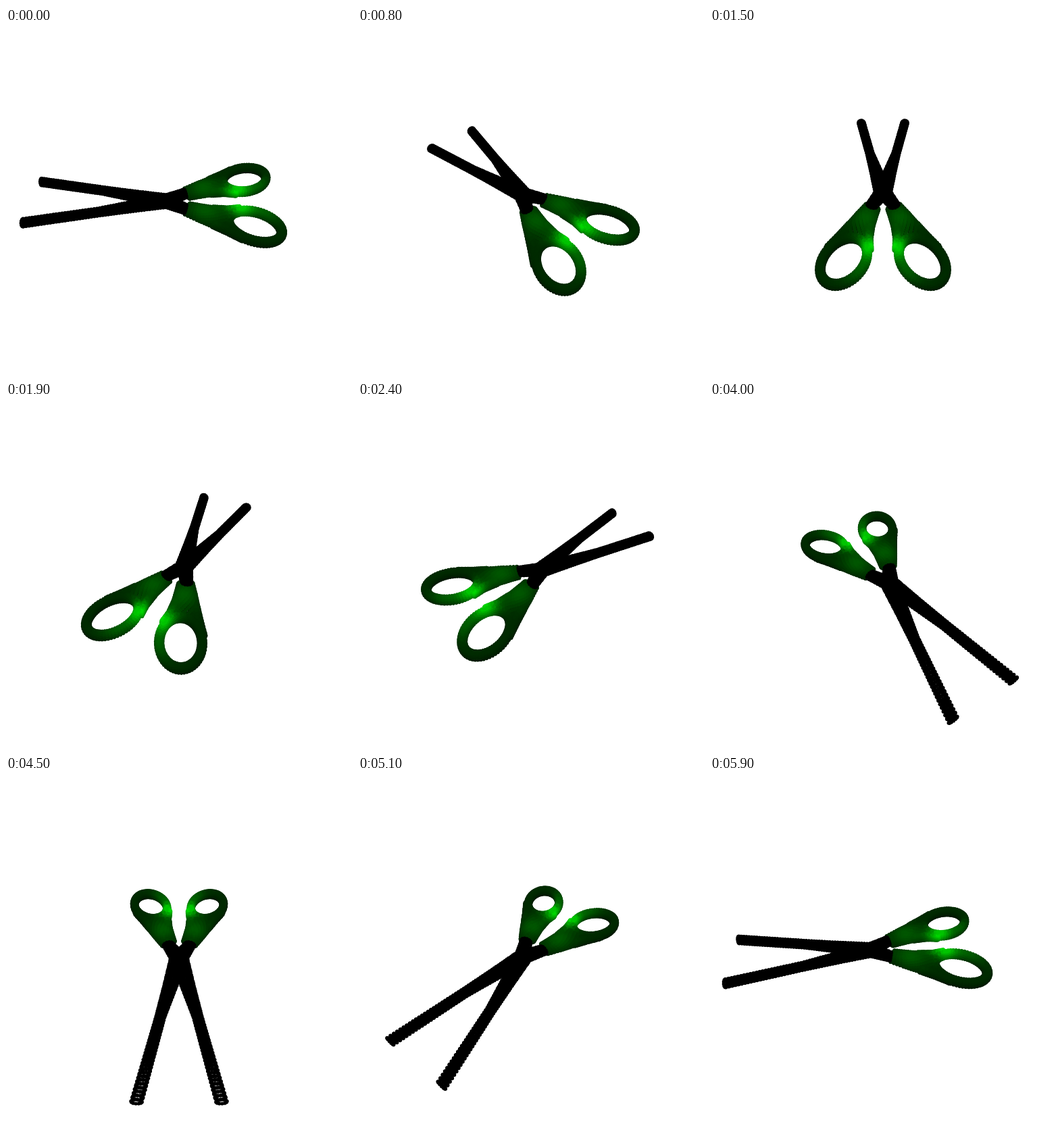
Write an HTML page with a canvas that moves like this. It is 512 px wide and 512 px high and loops after 6000 ms.

```html
<!DOCTYPE html>
<html>
<head>
<meta charset="utf-8">
<style>
html, body { margin: 0; width: 100%; height: 100%; overflow: hidden; background: #fff; }
canvas { display: block; }
</style>
</head>
<body>
<canvas id="stage" width="512" height="512"></canvas>
<script>
const ctx = document.getElementById('stage').getContext('2d');
const TILT = Math.SQRT1_2, DEPTH = 0.0015, DOT = 2.7, TAU = Math.PI * 2;

// Each section is a pair of edge points: [x1, y1, x2, y2]
const blade = [
  [-216, -48, -216, -37], [-117, -28, -117, -17.5], [-70, -20, -72, -4],
  [-19, -12, -19, 12], [11, 9, 7, 23]
];
const grip = [
  [17, 6, 8, 26], [30, 9, 25, 37], [49, 13, 45, 49], [67, 17, 64, 60]
];
const outerFillet = [[45, 49, 58, 44], [64, 61, 67, 48], [84, 74, 77, 60]];
const innerFillet = [[49, 13, 52, 24], [70, 15, 68, 24], [88, 14, 82, 18]];

const bump = (x, y, cx, cy, r) => Math.exp(-((x - cx) ** 2 + (y - cy) ** 2) / (r * r));

function green(x, y, lift) {
  const g = 42 + 175 * bump(x, y, 88, 14, 19) + 45 * bump(x, y, 38, 22, 24)
    + 45 * bump(x, y, 122, 28, 22);
  return `rgb(0,${Math.round(g * (0.72 + 0.28 * lift))},0)`;
}

// Oval loop of dots spanning one section, mirrored for the other half
let loops = 0;
function addLoop(list, [x1, y1, x2, y2], count, height, color) {
  const phase = loops++ * 0.37;
  for (let i = 0; i < count; i++) {
    const a = (i + phase) / count * TAU, k = (1 + Math.cos(a)) / 2, lift = Math.sin(a);
    const x = x1 + (x2 - x1) * k, y = y1 + (y2 - y1) * k, z = height * lift;
    const fill = color || green(x, y, lift);
    list.push({ x, y, z, fill }, { x, y: -y, z, fill });
  }
}

function sweep(list, sections, step, count, height, color) {
  for (let i = 1; i < sections.length; i++) {
    const a = sections[i - 1], b = sections[i];
    const steps = Math.round(Math.hypot(b[0] - a[0], b[1] - a[1]) / step);
    for (let j = i > 1 ? 1 : 0; j <= steps; j++)
      addLoop(list, a.map((v, n) => v + (b[n] - v) * j / steps), count, height, color);
  }
}

function ovalPoint(t, a, b) {
  const turn = 25 * Math.PI / 180, c = Math.cos(turn), s = Math.sin(turn);
  const u = a * Math.cos(t), v = b * Math.sin(t);
  return [104 + u * c - v * s, 48.5 + u * s + v * c];
}

const handles = [], blades = [];
sweep(handles, grip, 3, 22, 6);
sweep(handles, outerFillet, 3, 12, 5.5);
sweep(handles, innerFillet, 3, 12, 5.5);
for (let i = 0; i < 60; i++) {
  const t = i / 60 * TAU;
  addLoop(handles, [...ovalPoint(t, 32, 22), ...ovalPoint(t, 41, 30.5)], 12, 6.5);
}
sweep(blades, blade, 4, 12, 5.5, '#000');
handles.sort((a, b) => a.z - b.z);
const points = handles.concat(blades);

function draw(now) {
  const angle = Math.floor(now % 6000 / 100) / 60 * TAU;
  const c = Math.cos(angle), s = Math.sin(angle);
  ctx.fillStyle = '#fff';
  ctx.fillRect(0, 0, 512, 512);
  for (const { x, y, z, fill } of points) {
    const px = x * c - y * s, py = x * s + y * c;
    const scale = 1 / (1 - DEPTH * (py + z));
    ctx.fillStyle = fill;
    ctx.beginPath();
    ctx.arc(256 + px * scale, 256 + TILT * (py - z) * scale, DOT, 0, TAU);
    ctx.fill();
  }
}

const start = performance.now();
function tick() {
  draw(performance.now() - start);
  requestAnimationFrame(tick);
}
tick();
</script>
</body>
</html>
```
